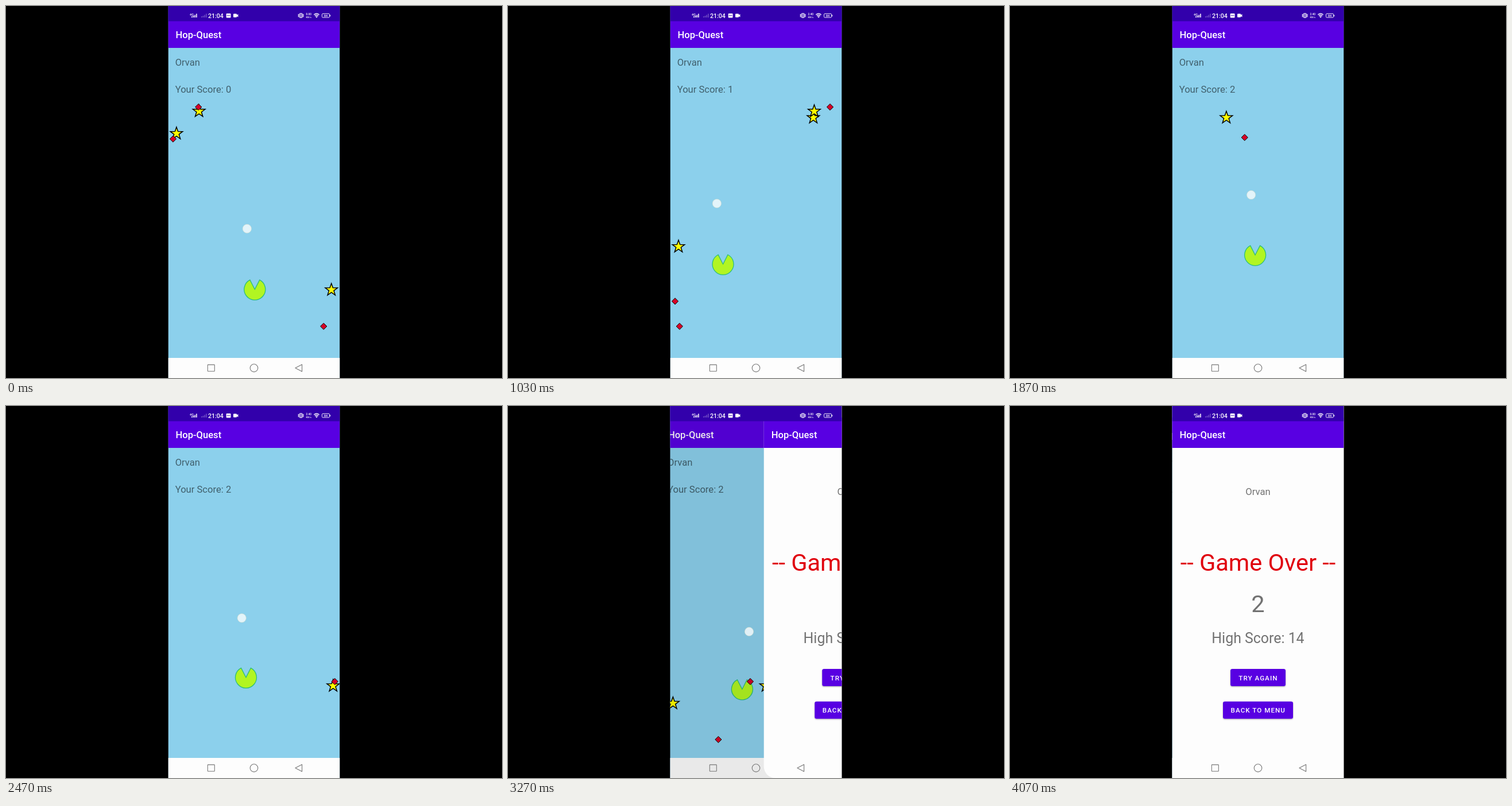
An HTML page for the animation above (4.81 s loop, 864 by 648 pixels).

```html
<!DOCTYPE html>
<html lang="en">
<head>
<meta charset="utf-8">
<title>Arcade screen</title>
<style>
  html, body { margin: 0; width: 100%; height: 100%; overflow: hidden; background: #000; }
  svg { display: block; width: 100vw; height: 100vh; font-family: Roboto, "Open Sans", sans-serif; }
  .title { font-size: 16.6px; font-weight: 500; fill: #fff; }
  .label { font-size: 16.6px; fill: #000; fill-opacity: .54; }
  .mid { text-anchor: middle; fill: #727272; }
  .button { font-size: 11.63px; font-weight: 500; letter-spacing: 1.04px; fill: #fff; }
  .tiny { font-size: 4.8px; font-weight: 500; text-anchor: middle; fill: #fff; }
</style>
</head>
<body>
<svg viewBox="0 0 864 648">
  <defs>
    <clipPath id="panel"><rect x="282.5" width="299" height="648"/></clipPath>
    <filter id="lift" x="-10%" y="-20%" width="120%" height="150%">
      <feDropShadow dx="0" dy="1" stdDeviation="1" flood-opacity=".35"/>
    </filter>
  </defs>
  <rect width="864" height="648"/>
  <g clip-path="url(#panel)">
    <g id="game">
      <rect x="282.5" width="299" height="648" fill="#8cd0ec"/>
      <rect x="282.5" width="299" height="73" fill="#5800e2"/>
      <text class="title" x="295.5" y="56.3">Hop-Quest</text>
      <text class="label" x="294.7" y="103.5">Orvan</text>
      <text class="label" x="294.7" y="150.8" id="score"></text>
      <g id="stars" fill="#ff0" stroke="#000" stroke-width="1.5"></g>
      <path id="player" fill="#b2f522" stroke="#2fbd78" stroke-width="1.3"/>
      <g id="gems" fill="#d80028" stroke="#000"></g>
      <rect x="282.5" y="613" width="299" height="35" fill="#fdfdfd"/>
    </g>
    <rect id="dim" x="282.5" width="299" height="648"/>
    <g id="over">
      <rect id="sheet" x="282.5" width="320" height="648" fill="#fdfdfd"/>
      <rect x="282.5" y="20" width="299" height="53" fill="#5800e2"/>
      <text class="title" x="295.5" y="56.3">Hop-Quest</text>
      <text class="mid" x="432" y="154.5" font-size="16.6">Orvan</text>
      <text class="mid" x="432" y="287" font-size="41.5" style="fill:#e0000c">-- Game Over --</text>
      <text class="mid" x="432" y="359" font-size="41.5">2</text>
      <text class="mid" x="432" y="413" font-size="24.9">High Score: 14</text>
      <g fill="#5800e2" filter="url(#lift)">
        <rect x="384" y="458" width="96" height="30" rx="3.3"/>
        <rect x="371" y="514.7" width="122" height="30" rx="3.3"/>
      </g>
      <text class="button" x="398.3" y="477.6">TRY AGAIN</text>
      <text class="button" x="384.6" y="534">BACK TO MENU</text>
    </g>
    <g id="status" fill="#fff">
      <rect x="282.5" width="299" height="26.5" fill="#3200ab"/>
      <text class="tiny" x="323.5" y="16.5" style="font-size:5.5px">4G</text>
      <path d="M323 20v-2h1.6v2zm2.7 0v-3h1.6v3zm2.7 0v-4.5h1.6v4.5zm2.7 0v-6.5h1.6v6.5z"/>
      <path opacity=".3" d="M340 20v-2h1.6v2zm2.7 0v-3h1.6v3zm2.7 0v-4.5h1.6v4.5zm2.7 0v-6.5h1.6v6.5z"/>
      <text x="352" y="20.6" font-size="10.6" font-weight="500">21:04</text>
      <rect x="383.7" y="13" width="7.8" height="7.4" rx="1.2"/>
      <path d="M385 16.7h5.2" stroke="#3200ab" stroke-width="1.2" stroke-dasharray="1.3 .6"/>
      <path d="M396 14.6q0-1 1-1h4q1 0 1 1v.9l2.4-1.2v4.9l-2.4-1.2v.8q0 1-1 1h-4q-1 0-1-1z"/>
      <g fill="none" stroke="#fff">
        <rect x="511.2" y="13" width="5" height="7.2" rx=".8" fill="#fff" fill-opacity=".4"/>
        <path d="M509.4 14v5.2M518 14v5.2" stroke-width="1.1"/>
        <path d="M536.4 15.2q4.6-3.8 9.2 0M538 17.2q3-2.4 6 0" stroke-width="1.4"/>
        <rect x="550.5" y="13.4" width="13" height="6.6" rx="1.4" stroke-width=".9"/>
        <path d="M564.8 15.4v2.8"/>
      </g>
      <path d="M539 18.4q2-1.4 4 0l-2 2.2z"/>
      <text class="tiny" x="527.2" y="16.2" id="rate"></text>
      <text class="tiny" x="527.2" y="21.2" style="font-size:4.3px">KB/s</text>
      <text class="tiny" x="557" y="18.7" style="font-size:5.4px">84</text>
    </g>
    <g fill="none" stroke="#777" stroke-width="1.1">
      <rect x="351.3" y="624.9" width="12" height="11.4" rx=".6"/>
      <circle cx="432" cy="630.6" r="6.8"/>
      <path d="M504 630.6l11.6-6.2v12.4z" stroke-linejoin="round"/>
    </g>
    <circle id="touch" r="7.6" fill="#fff" fill-opacity=".76" stroke="#d8dcc8" stroke-opacity=".55"/>
  </g>
</svg>
<script>
const LOOP = 4810, HIT = 3030, SLIDE = 3195, SLIDE_MS = 416, LIFT = 3450, WIDTH = 299;
const EATEN = [700, 1250];
const $ = id => document.getElementById(id);

// Movers: position at time "at", velocity in px/ms, optional time of removal.
const stars = [
  { x: 532, y: 194.5, at: 1030, vx: -.1845 },
  { x: 567, y: 494.5, at: 0, vx: -.1895, until: EATEN[0] },
  { x: 336, y: 183.3, at: 0, vx: .1915 },
  { x: 297, y: 222, at: 0, vy: .1912, until: EATEN[1] },
  { x: 570, y: 487.5, at: 2470, vx: -.186 },
  { x: 304, y: 518, at: HIT, vx: .19 }
];
const gems = [
  { x: 335, y: 176, at: 0, vx: .2192 },
  { x: 291, y: 231.3, at: 0, vy: .2745 },
  { x: 553.5, y: 558, at: 0, vx: -.247 },
  { x: 409, y: 229, at: 1870, vx: -.247 },
  { x: 573, y: 480, at: 2470, vx: -.24 },
  { x: 383, y: 581, at: HIT, vx: .22 }
];

// Keys: time, x, y
const playerKeys = [
  [0, 433.5, 493.7], [430, 373, 447], [700, 414, 474], [1030, 374.7, 449.7],
  [1250, 322, 466], [1870, 427, 433.8], [2470, 418, 472.8], [HIT, 424.5, 493.3]
];
const touchKeys = [
  [0, 420, 388], [430, 368, 341.4], [700, 406, 369], [1030, 364, 344],
  [1250, 315, 361], [1870, 420, 329], [2470, 410.7, 369.3], [3270, 420, 393]
];

// Smooth curve through timed keys (cubic Hermite with finite-difference slopes).
function follow(keys, t) {
  const last = keys.length - 1;
  if (t >= keys[last][0]) return keys[last].slice(1);
  let i = 0;
  while (t >= keys[i + 1][0]) i++;
  const a = keys[i], b = keys[i + 1], span = b[0] - a[0], u = (t - a[0]) / span;
  const slope = (k, axis) => {
    const p = keys[Math.max(k - 1, 0)], n = keys[Math.min(k + 1, last)];
    return (n[axis] - p[axis]) / (n[0] - p[0]);
  };
  return [1, 2].map(axis =>
    a[axis] * (1 + 2 * u) * (1 - u) ** 2 + b[axis] * u * u * (3 - 2 * u) +
    span * (slope(i, axis) * u * (1 - u) ** 2 - slope(i + 1, axis) * u * u * (1 - u)));
}

const polar = (r, deg) => {
  const a = deg * Math.PI / 180;
  return (r * Math.sin(a)).toFixed(2) + ',' + (-r * Math.cos(a)).toFixed(2);
};
const starShape = 'M' + Array.from({ length: 10 }, (_, i) => polar(i % 2 ? 4.5 : 11.3, i * 36)).join('L') + 'Z';
const gemShape = 'M0-5.6L5.6 0 0 5.6-5.6 0Z';
$('player').setAttribute('d', `M0 0L${polar(18.5, 27)}A18.5 18.5 0 1 1 ${polar(18.5, -27)}Z`);

function build(list, group, shape) {
  for (const item of list) {
    item.node = document.createElementNS('http://www.w3.org/2000/svg', 'path');
    item.node.setAttribute('d', shape);
    $(group).append(item.node);
  }
}
build(stars, 'stars', starShape);
build(gems, 'gems', gemShape);

const move = (node, x, y) => node.setAttribute('transform', `translate(${x.toFixed(2)} ${y.toFixed(2)})`);
const show = (node, on) => node.setAttribute('visibility', on ? 'visible' : 'hidden');
const setText = (id, text) => { if ($(id).textContent !== text) $(id).textContent = text; };

function draw(t) {
  const playTime = Math.min(t, HIT);
  for (const m of [...stars, ...gems]) {
    const dt = playTime - m.at;
    move(m.node, m.x + (m.vx || 0) * dt, m.y + (m.vy || 0) * dt);
    show(m.node, t < (m.until || LOOP));
  }
  move($('player'), ...follow(playerKeys, t));
  move($('touch'), ...follow(touchKeys, t));
  show($('touch'), t < LIFT);
  setText('score', 'Your Score: ' + EATEN.filter(e => t >= e).length);
  setText('rate', t >= 230 && t < 2950 ? '2.40' : '0.00');

  const p = Math.min(Math.max((t - SLIDE) / SLIDE_MS, 0), 1);
  const slide = 1 - (1 - p) ** 3;
  move($('game'), -36.6 * slide, 0);
  move($('over'), WIDTH * (1 - slide), 0);
  show($('over'), p > 0);
  $('sheet').setAttribute('rx', p < 1 ? 20 : 0);
  $('dim').setAttribute('opacity', .17 * slide);
}

const start = performance.now();
function tick() {
  draw((performance.now() - start) % LOOP);
  requestAnimationFrame(tick);
}
tick();
</script>
</body>
</html>
```
